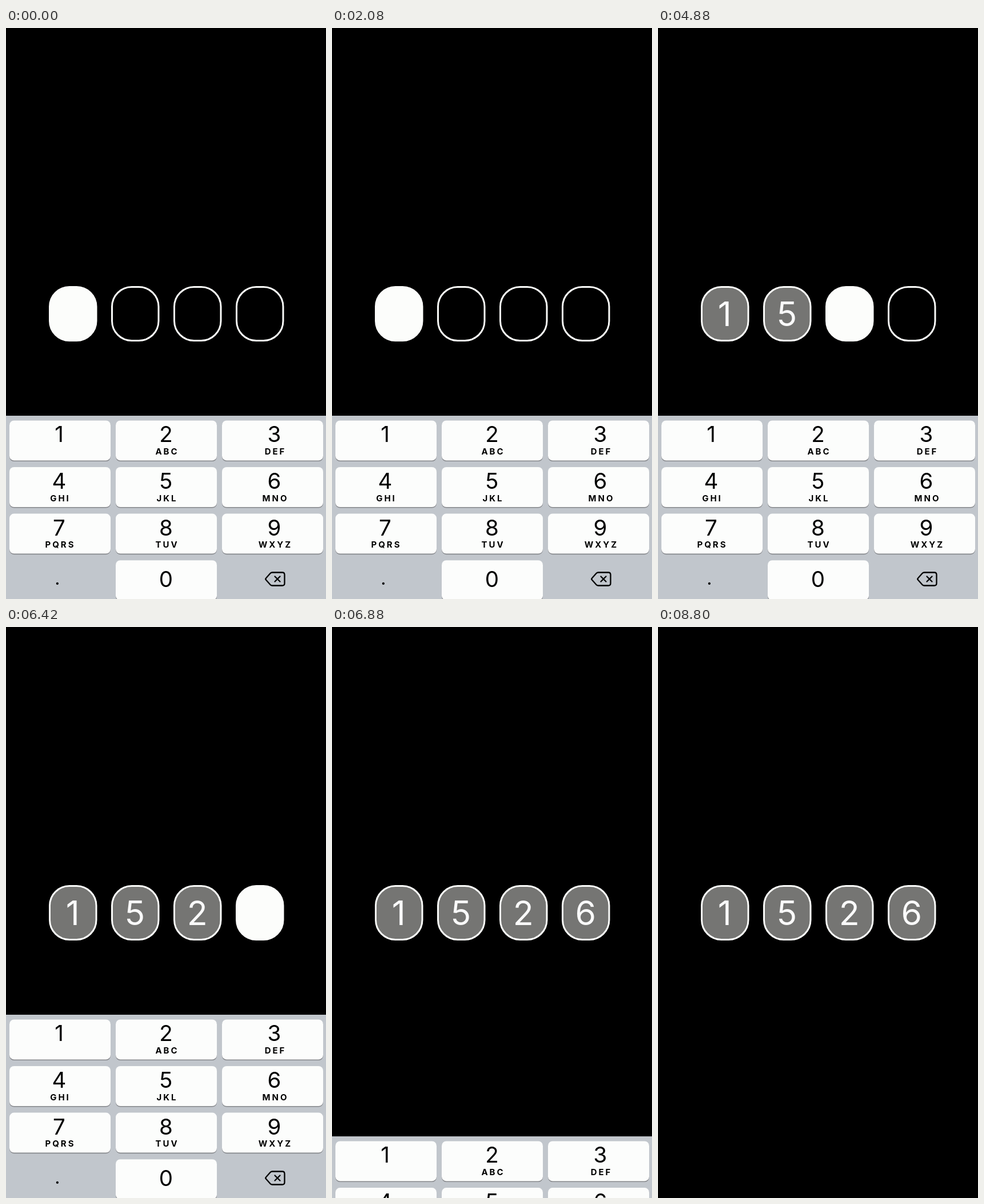
These frames come from a looping animation (560x1000 px, 8900 ms). An HTML page:

```html
<!DOCTYPE html>
<html lang="en">
<head>
<meta charset="utf-8">
<title>Passcode entry</title>
<style>
  html, body { margin: 0; height: 100%; overflow: hidden; background: #000; }
  svg { display: block; width: 100%; height: 100%; }
  text { font-family: Inter, "Liberation Sans", sans-serif; text-anchor: middle; }
  .cell rect { stroke: #fcfdfb; stroke-width: 3; }
  .cell text { font-size: 59px; fill: #fafafa; }
  .digit { font-size: 38.5px; }
  .letters { font-size: 15px; font-weight: 700; letter-spacing: 3px; }
</style>
</head>
<body>
<svg viewBox="0 0 560 1000">
  <g id="cells"></g>
  <g id="keyboard">
    <rect y="679" width="560" height="330" fill="#c1c6cc"/>
    <g id="keys"></g>
    <text x="89.8" y="974.5" font-size="32">.</text>
    <path d="M466 953.5H483.5Q487.5 953.5 487.5 957.5V972.5Q487.5 976.5 483.5 976.5H466Q464 976.5 462.5 975L455 966.5Q453.5 965 455 963.5L462.5 955Q464 953.5 466 953.5ZM470.5 960.5l9 9m0-9l-9 9"
      fill="none" stroke="#000" stroke-width="2.3" stroke-linecap="round" stroke-linejoin="round"/>
  </g>
</svg>
<script>
const LOOP = 8900;
const CODE = "1526";
const TYPED_AT = [2680, 4040, 5560, 6700];
const SLIDE_AT = 6840;
const SLIDE_DISTANCE = 321;
const LETTERS = ["", "ABC", "DEF", "GHI", "JKL", "MNO", "PQRS", "TUV", "WXYZ"];
const LABEL_X = [93, 280, 469.5];

const byId = id => document.getElementById(id);

function add(parent, tag, attrs, text = "") {
  const el = document.createElementNS("http://www.w3.org/2000/svg", tag);
  for (const name in attrs) el.setAttribute(name, attrs[name]);
  el.textContent = text;
  return parent.appendChild(el);
}

function addKey(digit, col, row, letters) {
  const keys = byId("keys");
  const x = 6 + 186 * col, y = 687.4 + 81.6 * row;
  const box = { x, width: 177, height: 70, rx: 8 };
  add(keys, "rect", { ...box, y: y + 1.6, fill: "#85878b" });
  add(keys, "rect", { ...box, y, fill: "#fcfdfc" });
  add(keys, "text", { x: LABEL_X[col], y: y + (digit ? 38 : 47), class: "digit" }, digit);
  add(keys, "text", { x: LABEL_X[col] + 2, y: y + 59.5, class: "letters" }, letters);
}

LETTERS.forEach((letters, i) => addKey(i + 1, i % 3, Math.floor(i / 3), letters));
addKey(0, 1, 3, "");

const cells = [...CODE].map((digit, i) => {
  const group = add(byId("cells"), "g", { class: "cell" });
  const x = 76.5 + 109 * i;
  return {
    box: add(group, "rect", { x, y: 453.5, width: 81.5, height: 94, rx: 34.5 }),
    label: add(group, "text", { x: x + 40.2, y: 522 }, digit)
  };
});

// The slide plays in uneven steps: two of 20 ms, then one of 100 ms.
function slideOffset(t) {
  if (t < SLIDE_AT) return 0;
  const d = t - SLIDE_AT;
  const step = 3 * Math.floor(d / 140) + Math.min(2, Math.floor(d % 140 / 20));
  const phase = 18.3 * (0.031 + step * 0.0467);
  return SLIDE_DISTANCE * (1 - (1 + phase) * Math.exp(-phase));
}

function draw(now) {
  const t = now % LOOP;
  const typed = TYPED_AT.filter(at => t >= at).length;
  cells.forEach(({ box, label }, i) => {
    box.setAttribute("fill", i < typed ? "#757573" : i === typed ? "#fcfdfb" : "#000");
    label.setAttribute("visibility", i < typed ? "visible" : "hidden");
  });
  const offset = slideOffset(t);
  byId("keyboard").setAttribute("transform", `translate(0 ${offset.toFixed(2)})`);
  byId("keyboard").setAttribute("visibility", offset > 320.5 ? "hidden" : "visible");
  requestAnimationFrame(draw);
}
requestAnimationFrame(draw);
</script>
</body>
</html>
```
